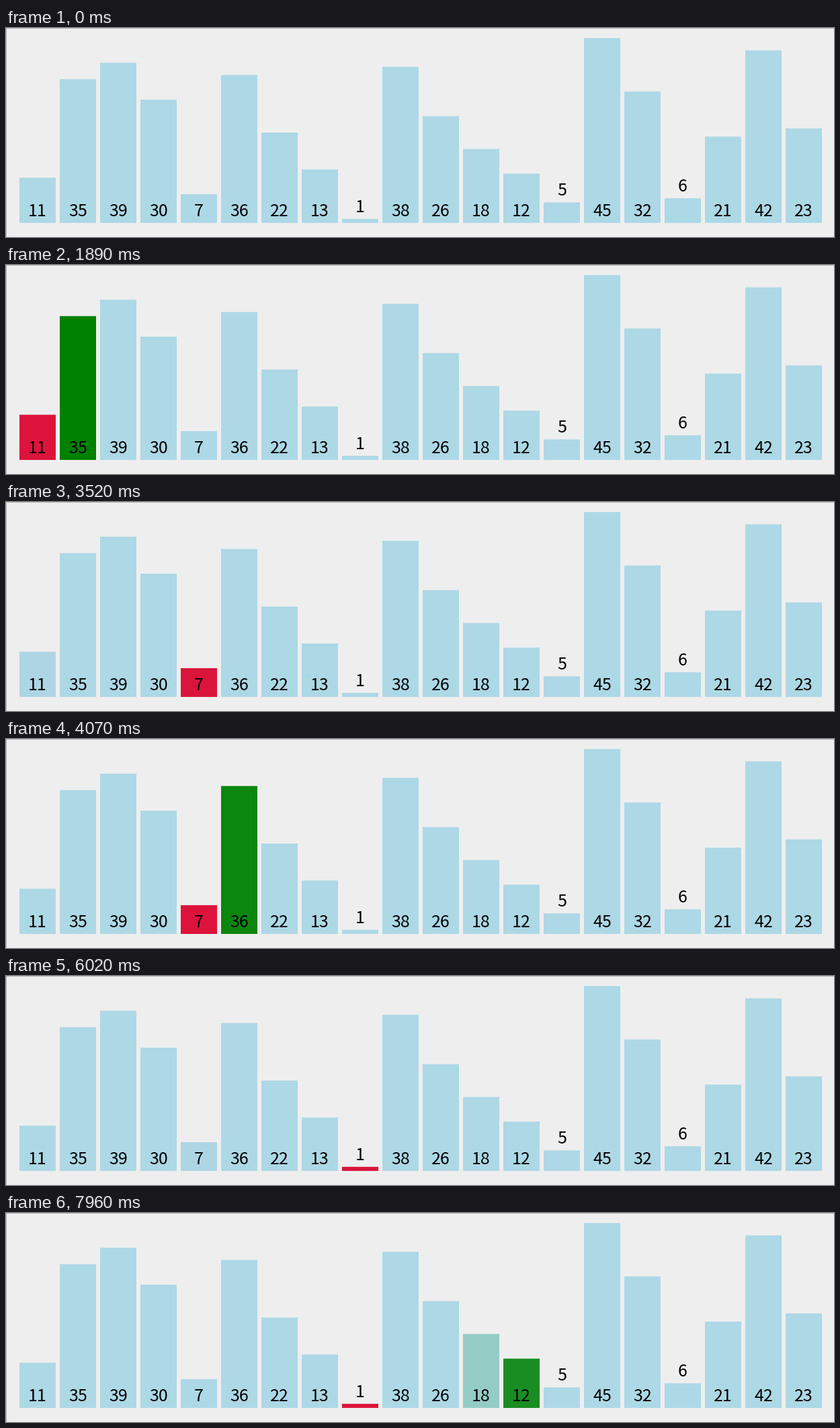
A matplotlib script for the animation above (8000 ms loop, 1232 by 312 pixels).

```python
import math

import matplotlib.pyplot as plt
import numpy as np
from matplotlib.animation import FuncAnimation
from matplotlib.colors import to_rgb
from matplotlib.patches import Rectangle

W, H, DPI = 1232, 312, 100
LOOP, INTERVAL = 8000, 20

VALUES = [11, 35, 39, 30, 7, 36, 22, 13, 1, 38,
          26, 18, 12, 5, 45, 32, 6, 21, 42, 23]
BASE, UNIT = 291, 276 / 45
BAR_W, PITCH, LEFT = 54, 60, 20

IDLE, SCAN, LOWEST = (np.array(to_rgb(c)) for c in ("lightblue", "green", "crimson"))

# Timing in ms: one search step per STEP, each a soft fade,
# seen on a coarse REFRESH grid that passes through SYNC
FIRST, STEP, FADE = 877, 498.5, 76
SYNC, REFRESH = 960, 77.8


def search_states():
    """Bar colours after each step of one selection-sort pass."""
    def paint(marks):
        colors = np.tile(IDLE, (len(VALUES), 1))
        for bar, color in marks.items():
            colors[bar] = color
        return colors

    low = 0
    states = [paint({}), paint({low: LOWEST})]
    for j in range(1, len(VALUES)):
        states.append(paint({low: LOWEST, j: SCAN}))
        if VALUES[j] < VALUES[low]:
            low = j
            states.append(paint({low: LOWEST}))
    return states


STATES = search_states()


def colors_at(t):
    shown = SYNC + REFRESH * math.floor((t - SYNC) / REFRESH)
    if shown < FIRST:
        return STATES[0]
    step, elapsed = divmod(shown - FIRST, STEP)
    p = 1 - math.exp(-(elapsed / FADE) ** 2)
    k = int(step)
    return (1 - p) * STATES[k] + p * STATES[k + 1]


fig = plt.figure(figsize=(W / DPI, H / DPI), dpi=DPI, facecolor="#eeeeee")
ax = fig.add_axes([0, 0, 1, 1])
ax.set_xlim(0, W)
ax.set_ylim(H, 0)
ax.axis("off")


def add_rect(x, y, w, h, color):
    return ax.add_patch(Rectangle((x, y), w, h, facecolor=color, linewidth=0, snap=False))


add_rect(0, 0, W, 1, "#b4b4b4")
add_rect(0, 0, 1, H, "#b4b4b4")

bars = []
for i, value in enumerate(VALUES):
    x, height = LEFT + PITCH * i, value * UNIT
    bars.append(add_rect(x, BASE - height, BAR_W, height, IDLE))
    # Labels of short bars sit above them
    foot = BASE if height > 40 else BASE - height
    ax.text(x + BAR_W / 2, foot - 10, str(value), ha="center", va="baseline",
            family="Noto Sans CJK JP", fontsize=25 * 72 / DPI, color="black")


def update(frame):
    for bar, color in zip(bars, colors_at((frame + 0.5) * INTERVAL)):
        bar.set_facecolor(color)
    return bars


anim = FuncAnimation(fig, update, frames=LOOP // INTERVAL, interval=INTERVAL,
                     repeat=True, repeat_delay=0, blit=False)
plt.show()
```
